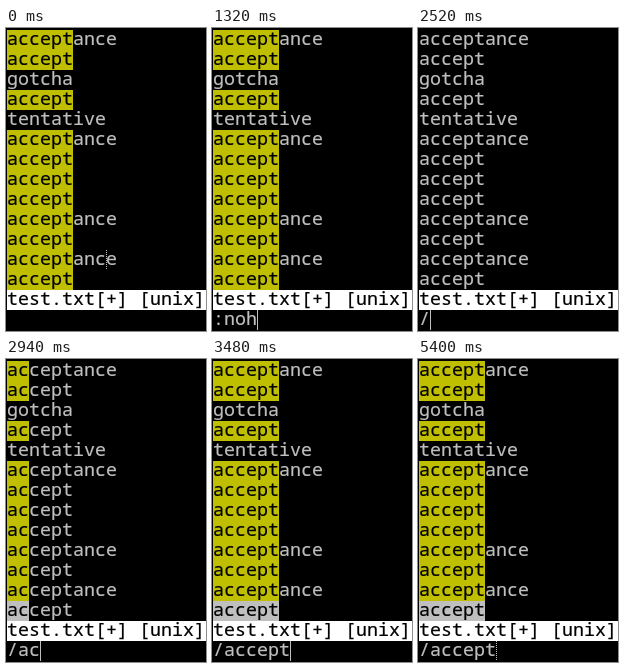
These frames come from a looping animation (200 px wide and 303 px high, 5460 ms). An HTML page:

```html
<!DOCTYPE html>
<html lang="en">
<head>
<meta charset="utf-8">
<title>Incremental search</title>
<style>
  html, body { margin: 0; width: 100%; height: 100%; overflow: hidden; background: #000; }
  #term {
    position: absolute; left: 0; top: 0; width: 200px; height: 303px; overflow: hidden;
    background: #000; color: #bfbfbf;
    font: 18.333px/16px "Noto Sans Mono", "DejaVu Sans Mono", monospace;
    font-variant-ligatures: none;
    -webkit-text-stroke: 0.2px;
  }
  .row { position: absolute; left: 1px; width: 199px; height: 20px; white-space: pre; }
  .row span { display: inline-block; height: 20px; vertical-align: top; background: #bfbf00; color: #000; }
  .row .current { background: #bfbfbf; }
  #status { background: #fff; color: #000; }
  #cursor { position: absolute; width: 1px; height: 20px; background: #bfbfbf; }
  #cursor.dotted { background: repeating-linear-gradient(#bfbfbf 0 1px, transparent 1px 2px); }
  #cursor.off { visibility: hidden; }
</style>
</head>
<body>
<div id="term"></div>
<script>
const LOOP = 5460, CELL = 11, LINE = 20, TOP = 2;
const EDIT = 11, STATUS = 13, CMD = 14;
const words = ("acceptance accept gotcha accept tentative acceptance accept " +
  "accept accept acceptance accept acceptance accept").split(" ");

// time, highlighted pattern, command line, cursor row, cursor column, cursor look
const steps = [
  [0, "accept", "", EDIT, 9, "dotted"],
  [240, "accept", "", EDIT, 9, ""],
  [780, "accept", ":", CMD, 1, ""],
  [1020, "accept", ":n", CMD, 2, ""],
  [1140, "accept", ":no", CMD, 3, ""],
  [1320, "accept", ":noh", CMD, 4, ""],
  [1560, "", ":noh", EDIT, 9, ""],
  [2040, "", ":noh", EDIT, 9, "off"],
  [2520, "", "/", CMD, 1, ""],
  [2760, "a", "/a", CMD, 2, ""],
  [2940, "ac", "/ac", CMD, 3, ""],
  [3060, "acc", "/acc", CMD, 4, ""],
  [3240, "acce", "/acce", CMD, 5, ""],
  [3360, "accep", "/accep", CMD, 6, ""],
  [3420, "accep", "/accept", CMD, 7, ""],
  [3480, "accept", "/accept", CMD, 7, ""],
  [3960, "accept", "/accept", CMD, 7, "off"],
  [4440, "accept", "/accept", CMD, 7, ""],
  [4920, "accept", "/accept", CMD, 7, "off"],
  [5400, "accept", "/accept", CMD, 7, "dotted"]
];

const term = document.getElementById("term");

function add(id, className) {
  const el = document.createElement("div");
  el.id = id;
  el.className = className;
  return term.appendChild(el);
}

function addRow(id, row, text) {
  const el = add(id, "row");
  el.style.top = TOP + row * LINE + "px";
  el.textContent = text;
  return el;
}

const rows = words.map((word, i) => addRow("line" + i, i, word));
addRow("status", STATUS, "test.txt[+] [unix]");
const command = addRow("command", CMD, "");
const cursor = add("cursor", "");

function mark(word, pattern, isCurrent) {
  if (!pattern) return word;
  const tag = isCurrent ? '<span class="current">' : "<span>";
  return word.split(pattern).join(tag + pattern + "</span>");
}

function show([, pattern, text, row, col, look]) {
  const searching = text[0] === "/";
  rows.forEach((el, i) => {
    el.innerHTML = mark(words[i], pattern, searching && i === words.length - 1);
  });
  command.textContent = text;
  cursor.className = look;
  cursor.style.left = 1 + col * CELL + "px";
  cursor.style.top = TOP + row * LINE + "px";
}

const start = performance.now();
let shown = null;

function tick() {
  const t = (performance.now() - start) % LOOP;
  const step = steps.findLast(s => s[0] <= t) || steps[0];
  if (step !== shown) show(shown = step);
  requestAnimationFrame(tick);
}
tick();
</script>
</body>
</html>
```
